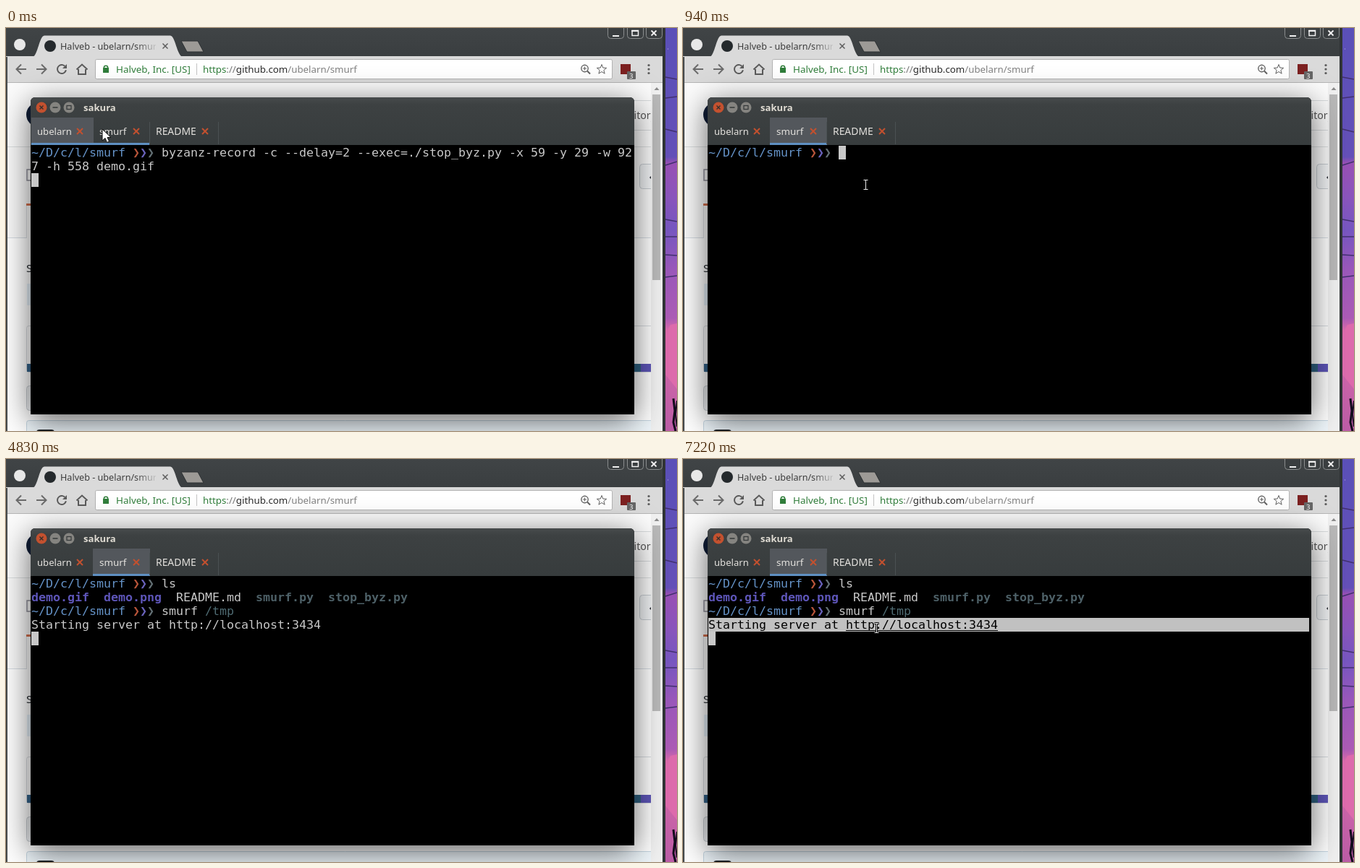
Animation of 927 by 558 pixels, one loop 8 s. Source, as an HTML page with a canvas:

```html
<!DOCTYPE html>
<html lang="en">
<head>
<meta charset="utf-8">
<title>Terminal session</title>
<style>
html, body { margin: 0; width: 100%; height: 100%; overflow: hidden; background: #3c4043; }
canvas { display: block; }
</style>
</head>
<body>
<canvas id="stage" width="927" height="558"></canvas>
<script>
const ctx = document.getElementById('stage').getContext('2d');
const LOOP = 8000;
const UI = '"Noto Sans", "Open Sans", sans-serif';
const MONO = '"DejaVu Sans Mono", monospace';
const USER = 'ubelarn', SITE = 'Halveb';
const CELL = 10, ROW = 19, LEFT = 35, TOP = 163;
const FG = '#c8c8c8', HINT = '#58696f', ORANGE = '#c3512f', BLUE = '#5f90c2', PURPLE = '#5d55b8';

function rect(x, y, w, h, color) {
  ctx.fillStyle = color;
  ctx.fillRect(x, y, w, h);
}

function box(x, y, w, h, r, fill, stroke) {
  ctx.beginPath();
  ctx.roundRect(x, y, w, h, r);
  if (fill) { ctx.fillStyle = fill; ctx.fill(); }
  if (stroke) { ctx.strokeStyle = stroke; ctx.lineWidth = 1; ctx.stroke(); }
}

function disc(x, y, r, color) {
  ctx.beginPath();
  ctx.arc(x, y, r, 0, Math.PI * 2);
  ctx.fillStyle = color;
  ctx.fill();
}

function path(points, close) {
  ctx.beginPath();
  points.forEach(([x, y], i) => i ? ctx.lineTo(x, y) : ctx.moveTo(x, y));
  if (close) ctx.closePath();
}

function line(points, color, width = 1) {
  path(points);
  ctx.strokeStyle = color;
  ctx.lineWidth = width;
  ctx.stroke();
}

function shape(points, fill, stroke) {
  path(points, true);
  if (fill) { ctx.fillStyle = fill; ctx.fill(); }
  if (stroke) { ctx.strokeStyle = stroke; ctx.lineWidth = 1; ctx.stroke(); }
}

function cross(x, y, r, color, width) {
  line([[x - r, y - r], [x + r, y + r]], color, width);
  line([[x + r, y - r], [x - r, y + r]], color, width);
}

function label(text, x, y, color, size, weight = '') {
  ctx.font = `${weight} ${size}px ${UI}`;
  ctx.fillStyle = color;
  ctx.fillText(text, x, y);
  return x + ctx.measureText(text).width;
}

function gradient(x0, y0, x1, y1, stops) {
  const g = ctx.createLinearGradient(x0, y0, x1, y1);
  stops.forEach(([at, color]) => g.addColorStop(at, color));
  return g;
}

// --- desktop and browser ---

function drawWallpaper() {
  rect(907, 0, 20, 558, '#303436');
  rect(911, 0, 16, 558, gradient(0, 0, 0, 558, [
    [0, '#5a50b8'], [0.32, '#6450b8'], [0.335, '#9850b4'], [0.42, '#8a55bc'],
    [0.5, '#7656c0'], [0.6, '#9a58ba'], [0.72, '#ab5bb5'], [0.75, '#da6bab'], [1, '#bb5ca6']
  ]));
  shape([[911, 425], [918, 411], [927, 409], [927, 500], [911, 480]], '#dd6bac');
  [[68, 3], [97, -2], [140, 4], [190, -5], [265, 3], [289, 0], [314, 1], [345, -2]].forEach(([y, slope]) =>
    line([[911, y], [919, y + slope / 2], [927, y + slope]], '#41306f', 1.5));
  line([[922, 513], [924, 530], [922, 546], [925, 558]], '#120c1c', 3);
  line([[927, 516], [925, 535], [927, 552]], '#120c1c', 2);
  rect(914, 28, 1, 2, '#8c84d0');
}

function drawTabStrip() {
  rect(0, 0, 907, 40, gradient(0, 0, 0, 40, [[0, '#404446'], [1, '#3a3e40']]));
  disc(19, 23, 8, '#e8e8e8');
  ctx.beginPath();
  ctx.moveTo(37, 40);
  ctx.bezierCurveTo(44, 38, 46, 11, 53, 10.5);
  ctx.lineTo(227, 10.5);
  ctx.bezierCurveTo(234, 11, 236, 38, 244, 40);
  ctx.fillStyle = '#dadada';
  ctx.fill();
  disc(61, 25, 8, '#24292c');
  ctx.save();
  ctx.beginPath();
  ctx.rect(74, 10, 133, 28);
  ctx.clip();
  const fade = gradient(180, 0, 207, 0, [[0, '#3b3b3b'], [1, '#3b3b3b20']]);
  label(`${SITE} - ${USER}/smurf`, 75, 29.5, fade, 12.6);
  ctx.restore();
  cross(220, 25, 3.5, '#5c5c5c', 1.5);
  shape([[242, 18], [265, 18], [273, 33], [250, 33]], '#9d9a96', '#2c3032');

  [831, 858, 884].forEach(x => box(x + .5, -4, 22, 18.5, 4, '#3a3e40', '#8a8d8e'));
  rect(838, 10, 9, 2, '#f0f0f0');
  ctx.strokeStyle = '#f0f0f0';
  ctx.lineWidth = 1.5;
  ctx.strokeRect(865, 3.5, 8.5, 7);
  rect(864, 3, 10, 2, '#f0f0f0');
  cross(895, 7, 3.5, '#f0f0f0', 1.8);
}

function arrow(x, dir, color) {
  line([[x - 7 * dir, 57], [x + 6 * dir, 57]], color, 2);
  line([[x, 50.5], [x + 6.5 * dir, 57], [x, 63.5]], color, 2);
}

function drawToolbar() {
  rect(0, 39, 907, 37, '#dadada');
  rect(0, 75, 907, 1, '#b5b5b5');
  arrow(21, -1, '#6a6a6a');
  arrow(49, 1, '#6a6a6a');
  ctx.beginPath();
  ctx.arc(77, 57, 6, 0.2, Math.PI * 1.75);
  ctx.strokeStyle = '#5a5a5a';
  ctx.lineWidth = 2;
  ctx.stroke();
  shape([[84, 50], [84, 56], [78, 56]], '#5a5a5a');
  line([[97.5, 57.5], [105, 50.5], [112.5, 57.5]], '#5a5a5a', 2);
  line([[100, 57], [100, 64], [110, 64], [110, 57]], '#5a5a5a', 2);

  box(123.5, 43.5, 714, 27, 2, '#fff', '#b2b2b2');
  rect(134, 55, 8, 7, '#2f7d3a');
  ctx.beginPath();
  ctx.arc(138, 55, 2.7, Math.PI, 0);
  ctx.strokeStyle = '#2f7d3a';
  ctx.lineWidth = 1.5;
  ctx.stroke();
  label(`${SITE}, Inc. [US]`, 152, 62, '#2f7d3a', 13.4);
  rect(263, 49, 1, 16, '#c4c4c4');
  let x = label('https', 272, 62, '#2f7d3a', 13.3);
  x = label('://', x, 62, '#777', 13.3);
  x = label('github.com', x, 62, '#2a2a2a', 13.3);
  label(`/${USER}/smurf`, x, 62, '#808080', 13.3);

  ctx.beginPath();
  ctx.arc(799.5, 56, 4.7, 0, Math.PI * 2);
  ctx.strokeStyle = '#606060';
  ctx.lineWidth = 1.4;
  ctx.stroke();
  line([[803, 59.5], [807, 63.5]], '#606060', 2);
  line([[797, 56], [802, 56]], '#606060');
  line([[799.5, 53.5], [799.5, 58.5]], '#606060');
  const star = Array.from({ length: 10 }, (_, i) => {
    const a = i * Math.PI / 5 - Math.PI / 2, r = i % 2 ? 3 : 7;
    return [823 + r * Math.cos(a), 57.5 + r * Math.sin(a)];
  });
  shape(star, null, '#5f5f5f');
  rect(849, 50, 14, 14, '#7c2020');
  box(858, 60, 12, 11, 1, '#666');
  label('3', 861, 69.5, '#fff', 9.5);
  [51.5, 57, 62.5].forEach(y => disc(888, y, 1.6, '#5a5a5a'));
}

function drawPage(focused) {
  rect(2, 76, 889, 482, '#fff');
  rect(2, 76, 889, 89, '#fcfcfc');
  rect(2, 164, 889, 1, '#dcdfe0');
  rect(2, 165, 889, 126, '#fafafa');
  rect(2, 290, 889, 1, '#d5dbe2');
  disc(45, 120, 17, focused ? '#101d36' : '#24292c');
  box(800.5, 100.5, 100, 41, 3, '#fbfbfb', '#d8dbdd');
  label('itory', 867.5, 126, '#555', 14.2);
  box(875.5, 188.5, 40, 34, 4, '#f0f2f4', '#c5cbd0');
  shape([[889, 207], [893, 203], [893, 211]], '#24292e');
  ctx.strokeStyle = '#8d8d98';
  ctx.lineWidth = 1.5;
  ctx.strokeRect(29, 196, 9, 15);
  rect(28, 244, 1, 47, '#dcdfe3');
  rect(29, 246, 6, 45, '#fff');
  rect(28, 243, 7, 3, '#d5704e');
  label('S', 28, 338, '#24292e', 15);
  rect(29, 354, 6, 30, '#e8f3fb');
  box(28.5, 412.5, 880, 64, 3, '#fff', '#d7dbdf');
  rect(29, 465, 862, 11, PURPLE);
  if (focused) {
    rect(29, 465, 6, 11, '#35648c');
    rect(860, 465, 17, 11, '#2f6282');
  }
  box(28.5, 495.5, 60, 34, 4, '#eff1f3', '#c6cbd0');
  box(28.5, 543.5, 880, 40, 3, '#eef6fb', '#c3d4e0');
  box(42, 556, 25, 10, 4, '#1b1f23');

  rect(891, 76, 16, 482, '#f1f1f1');
  shape([[895.5, 86], [899, 82], [902.5, 86]], '#8a8a8a');
  rect(893, 92, 11, 257, '#b9b9b9');
  rect(0, 40, 2, 518, '#45494b');
}

// --- terminal window ---

function drawWindow(s) {
  ctx.save();
  ctx.shadowColor = s.focused ? 'rgba(0,0,0,.62)' : 'rgba(0,0,0,.4)';
  ctx.shadowBlur = s.focused ? 44 : 24;
  ctx.shadowOffsetY = s.focused ? 9 : 6;
  box(34, 96, 834, 439, [6, 6, 0, 0], '#000');
  ctx.restore();
  box(34, 96, 834, 66, [6, 6, 0, 0], gradient(0, 96, 0, 162, [[0, '#474b4c'], [0.15, '#3d4142'], [1, '#373c3d']]));
  rect(34, 162, 834, 373, '#000');

  const grey = s.focused ? '#858480' : '#62625f';
  disc(49, 110, 7.5, s.focused ? ORANGE : grey);
  disc(68, 110, 7.5, grey);
  disc(87, 110, 7.5, grey);
  cross(49, 110, 2.5, '#3a302c', 1.5);
  line([[64.5, 110], [71.5, 110]], '#343839', 1.5);
  ctx.strokeStyle = '#343839';
  ctx.lineWidth = 1.2;
  ctx.strokeRect(84, 107.5, 6, 5);
  label('sakura', 107, 115, s.focused ? '#dfdbd2' : '#b85f49', 13.1, 'bold');

  if (s.tab === 0) {
    rect(35, 124, 86, 38, '#53575c');
    rect(35, 159, 163, 3, BLUE);
  } else {
    rect(120, 124, 79, 38, '#53575c');
    rect(120, 159, 79, 3, BLUE);
  }
  [198, 293].forEach(x => rect(x, 130, 1, 31, '#4b5153'));
  [[USER, 43, 102, 13.1], ['smurf', 129, 180, 13.4], ['README', 207, 275, 13.9]].forEach(([name, x, cx, size]) => {
    label(name, x, 148, '#e4e2de', size);
    cross(cx, 143, 4, ORANGE, 2);
  });
}

function put(text, col, row, color = FG, weight = '') {
  ctx.font = `${weight} 16.61px ${MONO}`;
  ctx.fillStyle = color;
  ctx.fillText(text, LEFT + col * CELL, TOP + row * ROW + 15);
}

function prompt(row) {
  put('~/D/c/l/smurf', 0, row, '#6593c8');
  ['#b9553a', '#6a63bd', '#637075'].forEach((color, i) => put('❯', 14 + i, row, color, 'bold'));
}

function cursor(col, row, color = FG) {
  rect(LEFT + col * CELL, TOP + row * ROW, CELL, ROW, color);
}

function drawRecorder(focused) {
  prompt(0);
  put('byzanz-record -c --delay=2 --exec=./stop_byz.py -x 59 -y 29 -w 92', 18, 0);
  put('7 -h 558 demo.gif', 0, 1);
  if (focused) return cursor(0, 2);
  ctx.strokeStyle = FG;
  ctx.lineWidth = 1;
  ctx.strokeRect(35.5, 201.5, 10, 18);
}

// Number of keys pressed by time t
const pressed = (times, t) => times.filter(at => t >= at).length;

function drawServer(t, pointer) {
  put('/tmp', 24, 2, '#4f6b72');
  put('smurf', 18, 2);
  if (t < 4830) return cursor(0, 3);
  const selected = t >= 7220;
  const color = selected ? '#000' : FG;
  if (selected) rect(LEFT, TOP + 3 * ROW, 83 * CELL, ROW, '#c1c1c1');
  put('Starting server at http://localhost:3434', 0, 3, color);
  if (pointer && pointer.y >= 220) rect(LEFT + 19 * CELL, 237, 21 * CELL, 1, color);
  cursor(0, 4);
}

function drawSession(t, pointer) {
  prompt(0);
  const ls = 'ls'.slice(0, pressed([1950, 2040], t));
  put(ls, 18, 0);
  if (t < 2120) return cursor(18 + ls.length, 0);
  put('demo.gif', 0, 1, PURPLE, 'bold');
  put('demo.png', 10, 1, PURPLE, 'bold');
  put('README.md', 20, 1);
  put('smurf.py', 31, 1, '#4d6067', 'bold');
  put('stop_byz.py', 41, 1, '#4d6067', 'bold');
  prompt(2);
  if (t >= 4790) return drawServer(t, pointer);
  const command = 'smurf /tmp';
  const n = pressed([3140, 3230, 3540, 3720, 3920], t);
  if (!n) return cursor(18, 2);
  put(command.slice(0, n), 18, 2);
  cursor(18 + n, 2, HINT);
  put(command[n], 18 + n, 2, '#000');
  put(command.slice(n + 1), 19 + n, 2, HINT);
}

// --- mouse pointer ---

const bend = (a, c, b, p) => (1 - p) ** 2 * a + 2 * p * (1 - p) * c + p * p * b;

function pointerAt(t) {
  if (t < 780) return { x: 133, y: 140 };
  if (t < 1950) {
    const p = Math.min(1, (Math.floor((t - 780) / 40) + 1) / 5);
    return { x: 133 + 119 * p, y: 140 + 77 * p };
  }
  if (t < 6220) return null;
  const p = Math.min(1, Math.floor((t - 6220) / 40.7) / 14);
  return { x: bend(258, 264, 267, p), y: bend(217, 153, 234, p) };
}

function drawPointer({ x, y }) {
  x = Math.round(x);
  y = Math.round(y);
  if (y < 162) {
    const tip = [[0, 0], [0, 16], [4, 12.5], [6.5, 18.5], [9.5, 17], [7, 11.5], [12, 11.5]];
    return shape(tip.map(([a, b]) => [x + a, y + b]), '#fff', '#111');
  }
  x += .5;
  [['#000', 3], ['#e8e8e8', 1]].forEach(([color, width]) => {
    line([[x, y - 6], [x, y + 6]], color, width);
    [-6.5, 6.5].forEach(dy => line([[x - 3, y + dy], [x + 3, y + dy]], color, width));
  });
}

function draw(t) {
  const focused = t < 290 || t >= 500;
  const tab = t < 500 ? 0 : 1;
  const pointer = pointerAt(t);
  drawTabStrip();
  drawToolbar();
  drawPage(focused);
  drawWallpaper();
  drawWindow({ focused, tab });
  if (tab === 0) drawRecorder(focused);
  else drawSession(t, pointer);
  if (pointer) drawPointer(pointer);
}

function tick() {
  draw(performance.now() % LOOP);
  requestAnimationFrame(tick);
}
tick();
</script>
</body>
</html>
```
